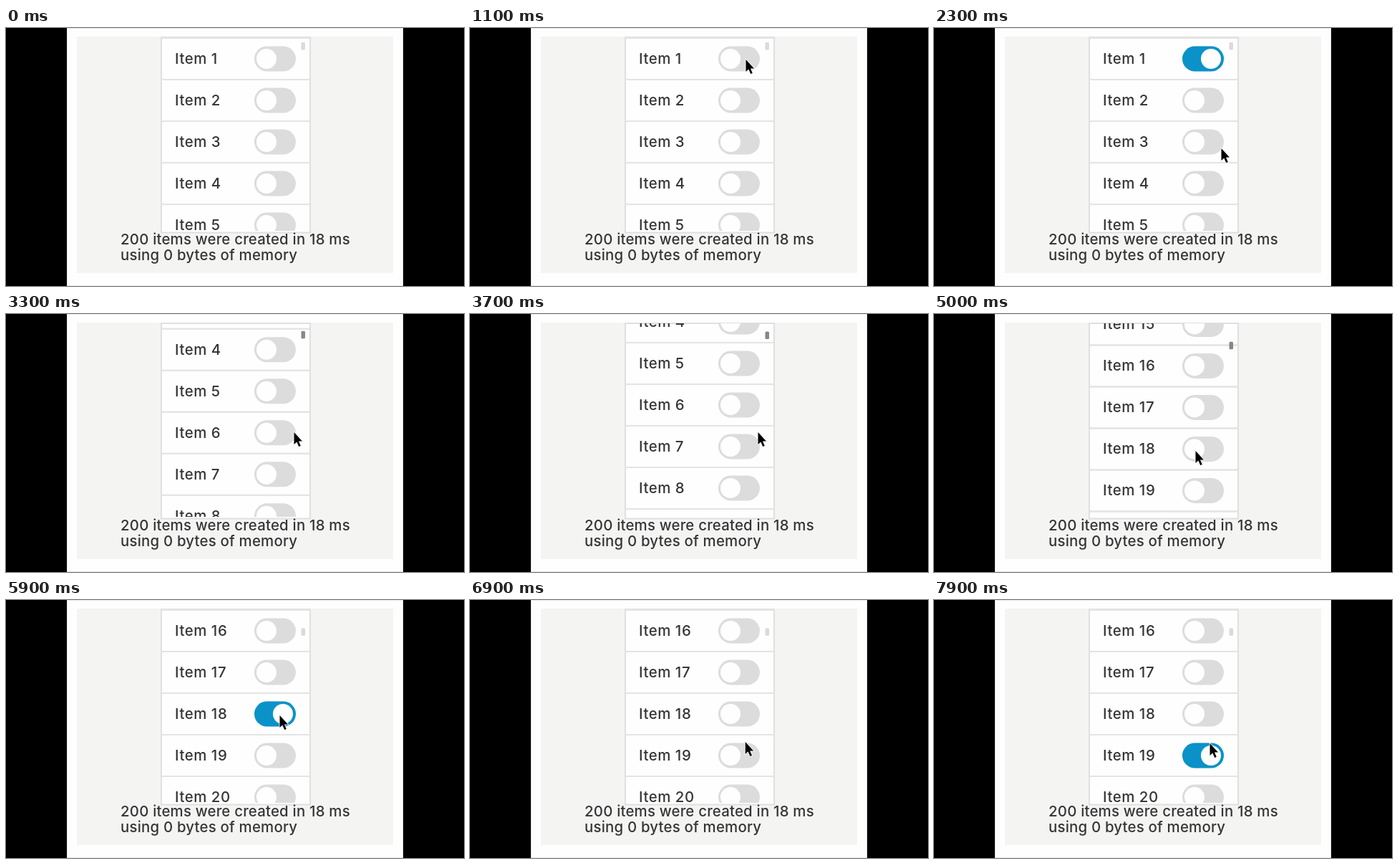
An HTML page that plays this animation: 640x360 px, repeating every 8 s.

```html
<!DOCTYPE html>
<html lang="en">
<head>
<meta charset="utf-8">
<title>Scrolling list</title>
<style>
  html, body { margin: 0; width: 100%; height: 100%; overflow: hidden; background: #000; }
  svg { display: block; width: 100vw; height: 100vh; }
  text { font: 500 20.4px Inter, "Open Sans", sans-serif; letter-spacing: .2px; fill: #353535; }
  .item { letter-spacing: .55px; }
</style>
</head>
<body>
<svg viewBox="0 0 640 360">
  <defs><clipPath id="view"><rect x="218" y="13" width="206" height="270"/></clipPath></defs>
  <rect width="640" height="360" fill="#000"/>
  <rect x="85.5" y=".5" width="469" height="359" fill="#fefefe" stroke="#e6e6e6"/>
  <rect x="99" y="12" width="442" height="330" fill="#f4f4f3"/>
  <rect x="217" y="13" width="208" height="272.5" fill="#fefefe" stroke="#e0e0e0" stroke-width="2"/>
  <g clip-path="url(#view)"><g id="rows"></g></g>
  <rect id="bar" x="412.5" width="5.5" height="10.5" rx="1.5" fill="#888"/>
  <text x="160" y="302">200 items were created in 18 ms</text>
  <text x="160" y="324">using 0 bytes of memory</text>
  <g id="pointer">
    <circle id="ring" cx="-.5" cy=".5" r="30" fill="#fff" fill-opacity=".3" stroke="#000" stroke-width="1.7"/>
    <path d="M.5 1V18L4.3 14.5L7.2 21L9.8 19.9L7 13.5H12Z" fill="#000" stroke="#fff" stroke-width="1.6" paint-order="stroke"/>
  </g>
</svg>
<script>
const LOOP = 8000, STEP = 100, PITCH = 58;
const ENTER = 400, HOLD = 200, FADE = 400, DRAG_SPEED = .25;
const $ = id => document.getElementById(id);
const clamp = u => Math.min(1, Math.max(0, u));
const smooth = u => u * u * (3 - 2 * u);
const throwOut = u => 1 - (1 - u) ** 3;
const mix = (a, b, u) => a + (b - a) * u;

const taps = [
  { item: 1, at: 1400 }, { item: 18, at: 5600 },
  { item: 18, at: 6500 }, { item: 19, at: 7300 }
];
const flicks = [
  { down: 2800, up: 3100, end: 3700, from: 0, to: 206 },
  { down: 4100, up: 4400, end: 5350, from: 206, to: 870 }
];
// Pointer stops: time, x, y
const stops = [
  [ENTER, 560, 280], [1100, 385, 43], [1400, 385, 43], [2300, 401, 167],
  [2800, 402, 239], [3100, 402, 164], [3700, 402, 164], [4100, 375, 215],
  [4400, 375, 140], [5000, 365, 190], [5400, 382, 160], [6500, 382, 160],
  [7100, 385, 210], [7300, 385, 210], [7800, 385, 199]
];

const dragging = t => flicks.some(f => t >= f.down && t < f.up);
const tapping = t => taps.some(tap => t >= tap.at - HOLD && t < tap.at);

function pointerAt(t) {
  const next = stops.findIndex(stop => stop[0] > t);
  if (next < 1) return (next ? stops[stops.length - 1] : stops[0]).slice(1);
  const [t0, x0, y0] = stops[next - 1], [t1, x1, y1] = stops[next];
  const u = (t - t0) / (t1 - t0);
  const eased = dragging(t) ? u : smooth(u);
  return [mix(x0, x1, eased), mix(y0, y1, eased)];
}

// The list follows the drag, then coasts to its resting place.
function scrollAt(t) {
  const f = flicks.filter(f => t >= f.down).pop();
  if (!f) return 0;
  const dragged = f.from + DRAG_SPEED * (Math.min(t, f.up) - f.down);
  return mix(dragged, f.to, throwOut(clamp((t - f.up) / (f.end - f.up))));
}

const barStrength = t => Math.max(...flicks.map(f =>
  Math.min(clamp((t - f.down) / FADE), clamp(1 - (t - f.end) / FADE))));

const switchAt = (item, t) => taps
  .filter(tap => tap.item === item)
  .reduce((on, tap) => mix(on, 1 - on, clamp((t - tap.at) / HOLD)), 0);

const row = n => `<g transform="translate(0 ${43 + PITCH * (n - 1)})">
  <path d="M217 -29H425M217 29H425" stroke="#e4e4e6" stroke-width="2"/>
  <text class="item" x="236" y="7">Item ${n}</text>
  <rect x="347" y="-17.5" width="58" height="35" rx="17.5" fill="#dcdcdc"/>
  <rect id="on${n}" x="347" y="-17.5" width="58" height="35" rx="17.5" fill="#0b92c8" opacity="0"/>
  <circle id="knob${n}" cx="364" r="14" fill="#fefefe"/>
</g>`;
$("rows").innerHTML = Array.from({ length: 21 }, (_, i) => row(i + 1)).join("");

function draw(t) {
  const offset = scrollAt(t);
  $("rows").setAttribute("transform", `translate(0 ${-offset})`);
  $("bar").setAttribute("y", 20 + offset * .0222);
  $("bar").setAttribute("opacity", mix(.3, 1, barStrength(t)));
  for (const { item } of taps) {
    const on = switchAt(item, t);
    $("on" + item).setAttribute("opacity", on);
    $("knob" + item).setAttribute("cx", mix(364, 387, on));
  }
  $("ring").setAttribute("visibility", dragging(t) || tapping(t) ? "inherit" : "hidden");
  $("pointer").setAttribute("visibility", t > ENTER ? "visible" : "hidden");
  $("pointer").setAttribute("transform", `translate(${pointerAt(t)})`);
}

const start = performance.now();
function tick() {
  const t = (performance.now() - start) % LOOP;
  draw(Math.floor(t / STEP) * STEP);
  requestAnimationFrame(tick);
}
tick();
</script>
</body>
</html>
```
